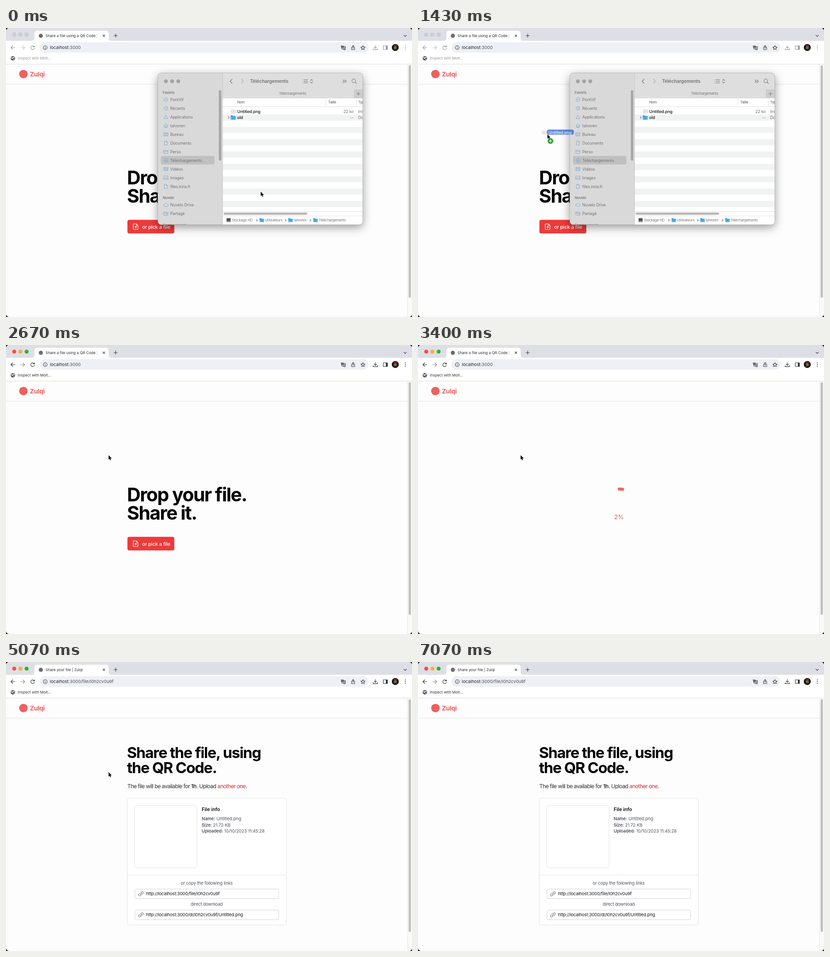
An HTML page for the animation above (7210 ms loop, 886 px wide and 632 px high).

```html
<!DOCTYPE html>
<html lang="en">
<head>
<meta charset="utf-8">
<title>Drop and share</title>
<style>
@property --p { syntax: "<integer>"; inherits: true; initial-value: 0; }

html, body { margin: 0; width: 100%; height: 100%; overflow: hidden; background: #17181b; }
body { position: relative; font-family: Inter, "Liberation Sans", sans-serif; font-optical-sizing: none; }
svg { display: block; position: absolute; left: 0; top: 0; }
.line { fill: none; stroke: currentColor; stroke-width: 1.1; stroke-linecap: round; stroke-linejoin: round; }
.anim, .anim-late { animation: 7.21s linear infinite; }
.anim-late { animation-delay: 50ms; }

/* browser */
#ui { animation-name: focus; }
#lights { animation-name: after-drop; }
#finder { animation-name: before-drop; }
.before-url { animation-name: before-url; }
.after-url { animation-name: after-url; }
.tab { font-size: 8.1px; fill: #2b2c30; }
.url { font-size: 9.6px; letter-spacing: -.005em; fill: #242528; }
.url tspan { fill: #4c4f54; }

/* page */
.web { letter-spacing: -.02em; font-size: 9.6px; fill: #505359; }
.h1 { font-weight: 700; letter-spacing: -.04em; fill: #050505; }
.lead { font-size: 12px; letter-spacing: -.05em; fill: #2d2f33; }
.lead .bold { letter-spacing: -.02em; }
.info { letter-spacing: -.012em; }
.bold { font-weight: 600; }
.box { fill: #fff; stroke: #dfe1e5; }
.field { fill: #fff; stroke: #cfd2d8; }
.ink { fill: #151619; }
#hero { animation-name: hero; }
#result { animation-name: result; }
#zone { animation-name: zone; }
#ring {
  position: absolute; left: 368.5px; top: 305.5px; width: 140px; height: 140px;
  animation-name: ring, fill; color: #f46363;
}
#ring circle { fill: none; stroke: currentColor; stroke-width: 6.6; stroke-linecap: round; stroke-dasharray: var(--p) 200; }
#ring::after {
  counter-reset: n var(--p); content: counter(n) "%";
  position: absolute; inset: 0; line-height: 140px; text-align: center;
  font-size: 13.4px; letter-spacing: -.02em; color: #dc5c5c;
}

/* file window */
#finder { letter-spacing: -.02em; font-size: 8.8px; fill: #747474; color: #747474; }
#finder .row { font-size: 9px; font-weight: 500; fill: #151515; }
#finder .small { font-size: 7.6px; }
#finder .head { font-size: 7.6px; font-weight: 600; fill: #7c7c7c; }
#side .line { color: #7da8ce; stroke-width: .9; }

/* pointer */
#cursor, #item { animation-name: move; }
#arrow { animation-name: arrow; }
#ghost { animation-name: ghost; }
#badge { animation-name: badge; }

@keyframes move {
  0%, .42% { transform: translate(556px, 358px); animation-timing-function: cubic-bezier(.4, 0, .3, 1); }
  9.7%, 11.8% { transform: translate(529px, 182px); animation-timing-function: cubic-bezier(.45, 0, .7, .7); }
  19.83% { transform: translate(283px, 232.5px); animation-timing-function: cubic-bezier(.2, .5, .5, 1); }
  25%, 100% { transform: translate(224px, 241px); }
}
@keyframes arrow { 0%, 83.2% { opacity: 1; } 86%, 100% { opacity: 0; } }
@keyframes ghost {
  0%, 11.8% { opacity: 0; }
  11.81%, 31.4% { opacity: .78; }
  31.41%, 32.3% { opacity: 1; }
  33.2%, 100% { opacity: 0; }
}
@keyframes badge {
  0%, 18.4% { opacity: 0; }
  18.41%, 31.4% { opacity: 1; }
  31.41%, 100% { opacity: 0; }
}
@keyframes zone {
  0%, 20.8% { opacity: 0; }
  22.5%, 32.4% { opacity: 1; }
  34.4%, 100% { opacity: 0; }
}
@keyframes focus {
  0%, 33.3% { color: #94969b; }
  33.31%, 100% { color: #303236; }
}
@keyframes before-drop { 0%, 33.3% { opacity: 1; } 33.31%, 100% { opacity: 0; } }
@keyframes after-drop { 0%, 33.3% { opacity: 0; } 33.31%, 100% { opacity: 1; } }
@keyframes before-url { 0%, 61.4% { opacity: 1; } 61.41%, 100% { opacity: 0; } }
@keyframes after-url { 0%, 61.4% { opacity: 0; } 61.41%, 100% { opacity: 1; } }
@keyframes hero { 0%, 40.6% { opacity: 1; } 43.4%, 100% { opacity: 0; } }
@keyframes ring {
  0%, 43.4% { opacity: 0; }
  46.2%, 61.4% { opacity: 1; }
  63.8%, 100% { opacity: 0; }
}
@keyframes fill {
  0%, 46.2% { --p: 0; animation-timing-function: ease-in-out; }
  55.5%, 100% { --p: 100; }
}
@keyframes result { 0%, 63.8% { opacity: 0; } 67.5%, 100% { opacity: 1; } }
</style>
</head>
<body>
<svg width="886" height="632" viewBox="0 0 886 632">
  <defs>
    <clipPath id="screen"><rect width="886" height="632" rx="7"/></clipPath>
    <clipPath id="pane"><rect x="331.5" y="98.5" width="447" height="331.5" rx="7.5"/></clipPath>
    <clipPath id="tabClip"><rect x="86" y="8" width="113" height="18"/></clipPath>
    <pattern id="zebra" y="189.2" width="10" height="27" patternUnits="userSpaceOnUse">
      <rect width="10" height="27" fill="#fff"/><rect width="10" height="13.5" fill="#f1f3f3"/>
    </pattern>
    <g id="folder">
      <path d="M0 1q0-1 1-1h3l1.2 1.3H10q1 0 1 1V4H0z" fill="#2f8fd6"/>
      <rect y="2.4" width="11" height="7" rx="1" fill="#53b5f1"/>
      <rect x="3.5" y="4.7" width="4" height="2.4" rx=".6" fill="#3595d8"/>
    </g>
    <g id="image">
      <rect x=".4" y=".4" width="9.2" height="6.6" rx="1.2" fill="#f7f7f7" stroke="#b4b4b4" stroke-width=".8"/>
      <rect x="2.2" y="2.2" width="5.6" height="3" rx=".6" fill="#dcdcdc"/>
    </g>
    <path id="link" class="line" d="M-1.2 1.5l3-3M-.6-2l1.8-1.9a2.3 2.3 0 0 1 3.3 3.3L2.6 1.2M.6 2l-1.8 1.9a2.3 2.3 0 0 1-3.3-3.3L-2.6-1.2"/>
  </defs>

  <g clip-path="url(#screen)">
    <rect width="886" height="632" fill="#fdfdfd"/>

    <g id="ui" class="anim">
      <rect width="886" height="28" fill="#dedfe6"/>
      <path d="M56 28q6 0 6-6V12q0-6 6-6H218q6 0 6 6V22q0 6 6 6z" fill="#fff"/>
      <rect y="28" width="886" height="51" fill="#fff"/>
      <rect x="73" y="31" width="718" height="23" rx="11.5" fill="#eef0f6"/>
      <path d="M0 79H886" stroke="#dadbdd"/>
      <g fill="#cfd0d6" stroke="#b4b5bb" stroke-width=".6">
        <circle cx="18" cy="14.5" r="4"/><circle cx="31.5" cy="14.5" r="4"/><circle cx="45" cy="14.5" r="4"/>
      </g>
      <g id="lights" class="anim">
        <circle cx="18" cy="14.5" r="4.3" fill="#fe4a43"/>
        <circle cx="31.5" cy="14.5" r="4.3" fill="#fbb02b"/>
        <circle cx="45" cy="14.5" r="4.3" fill="#25b53a"/>
      </g>
      <circle cx="76" cy="17" r="4.5" fill="#76686a"/>
      <g class="tab" clip-path="url(#tabClip)">
        <text class="anim before-url" x="86.3" y="19.9">Share a file using a QR Code | Zulqi</text>
        <text class="anim after-url" x="86.3" y="19.9">Share your file | Zulqi</text>
      </g>
      <g class="line" color="#3a3c40">
        <path d="M211.7 14.8l4 4m0-4l-4 4M235.5 16.7h7.6m-3.8-3.8v7.6M868.3 15.7l2.8 2.8 2.8-2.8"/>
        <circle cx="85.5" cy="43" r="4.2"/><path d="M85.5 42.7v2.4m0-4.4v.1"/>
        <path d="M731.3 39h4.4l2.4 7.2h-4.8zM735 40.5h5.6v7h-3.4M732.7 41.4h2.6m-1.3-.8q0 2.6-1.3 3.2m.6-2q.8 1.6 1.9 2M736.4 43.3h3"/>
        <path d="M755.8 42h-1.7v5.2h6.8V42h-1.7M757.5 44.6v-6.2m-1.9 1.8l1.9-1.8 1.9 1.8"/>
        <path d="M779 38.4l1.4 3 3.2.4-2.4 2.2.7 3.2-2.9-1.6-2.9 1.6.7-3.2-2.4-2.2 3.2-.4z"/>
      </g>
      <g class="line">
        <path d="M19.3 43h-8.6m4-4l-4 4 4 4"/>
        <path opacity=".55" d="M32.2 43h8.6m-4-4l4 4-4 4"/>
        <path d="M61.5 41A4 4 0 1 0 62 44.2M62.2 38.7v2.7h-2.7"/>
        <path d="M806 38.2v6m-2.6-2.4l2.6 2.5 2.6-2.5M801.2 44.8v2.6h9.6v-2.6"/>
        <path d="M823.4 39h9v8h-9z"/>
      </g>
      <g fill="currentColor">
        <path d="M829 39h3.4v8H829z"/>
        <circle cx="871.5" cy="39.3" r="1"/><circle cx="871.5" cy="43" r="1"/><circle cx="871.5" cy="46.7" r="1"/>
        <text x="25.8" y="69.2" font-size="8.1">Inspect with Molt…</text>
      </g>
      <circle cx="849.5" cy="42.7" r="7.6" fill="#24100d"/>
      <path d="M846 42q3.5-4 7 0l-1 4h-5z" fill="#4e7a49"/>
      <path d="M845 39q4.5-4 9 0l-1.5 1h-6zM844.5 46q5 4 10 0l-1 2h-8z" fill="#8d2a20"/>
      <circle cx="15" cy="66.3" r="4.8" fill="#505256"/>
      <path d="M11.5 64.5q3-1 3.5 1t-2 2zM16 62.7l2.5 2-1.2 1.8-2-1.5zM15.5 68.5l2.5-.8-1.5 2.3z" fill="#fff"/>
      <g class="url">
        <text class="anim before-url" x="95.8" y="46.4">localhost<tspan>:3000</tspan></text>
        <text class="anim after-url" x="95.8" y="46.4">localhost<tspan>:3000/file/l0h2cv0u9f</tspan></text>
      </g>
    </g>

    <path d="M0 123H876" stroke="#e1e2e4"/>
    <circle cx="38" cy="100.7" r="9.3" fill="#ef6060"/>
    <text class="web" x="52" y="105.6" style="font-size:13.8px;font-weight:700;fill:#ef6060">Zulqi</text>
    <rect x="876" y="80" width="10" height="552" fill="#fafafa"/>
    <path d="M876.3 80V632" stroke="#e6e6e6"/>
    <rect x="878.7" y="81.5" width="5" height="508.5" rx="2.5" fill="#bfbfbf"/>

    <g id="hero" class="anim web">
      <g class="h1" font-size="41.3">
        <text x="264" y="341.5">Drop your file.</text>
        <text x="264" y="382.3">Share it.</text>
      </g>
      <rect x="265" y="419.5" width="102.3" height="29.7" rx="4" fill="#ed3a3a"/>
      <g class="line" color="#fff">
        <path d="M284.5 428.3h-5.7q-1 0-1 1v10.4q0 1 1 1h8.2q1 0 1-1v-7.9zv3.5h3.5M283 438.3v-4.7m-2 1.9l2-2 2 2"/>
      </g>
      <text x="297" y="438.5" style="font-size:11px;font-weight:500;fill:#fff">or pick a file</text>
    </g>

    <g id="result" class="anim web">
      <g class="h1" font-size="33">
        <text x="264" y="210.2">Share the file, using</text>
        <text x="264" y="243">the QR Code.</text>
      </g>
      <text class="lead" x="264.8" y="276.2">The file will be available for <tspan class="bold">1h</tspan>. Upload <tspan fill="#d32d2d">another one</tspan>.</text>
      <rect class="box" x="264.5" y="297.5" width="347" height="277.5" rx="5"/>
      <rect class="box" x="280.5" y="314" width="136.5" height="136" rx="5"/>
      <path d="M264.5 466H611.5" stroke="#dfe1e5"/>
      <text class="bold ink" x="427" y="326.3" font-size="11">File info</text>
      <g class="info">
        <text x="427" y="346"><tspan class="bold">Name:</tspan> Untitled.png</text>
        <text x="427" y="359.5"><tspan class="bold">Size:</tspan> 21.72 KB</text>
        <text x="427" y="373"><tspan class="bold">Uploaded:</tspan> 10/10/2023 11:45:28</text>
      </g>
      <g text-anchor="middle">
        <text x="438" y="487.3">or copy the following links</text>
        <text x="438" y="533.3">direct download</text>
      </g>
      <rect class="field" x="281.5" y="496.5" width="313.5" height="21" rx="3"/>
      <rect class="field" x="281.5" y="542.5" width="313.5" height="21" rx="3"/>
      <g color="#777a80"><use href="#link" x="294.5" y="507"/><use href="#link" x="294.5" y="553"/></g>
      <text class="ink" x="305.5" y="510.4">http://localhost:3000/file/l0h2cv0u9f</text>
      <text class="ink" x="305.5" y="556.4">http://localhost:3000/dl/l0h2cv0u9f/Untitled.png</text>
    </g>

    <rect id="zone" class="anim" x="2.5" y="125.5" width="870.5" height="504" fill="none" stroke="#fbc1bf" stroke-width="5" style="filter:drop-shadow(0 0 2px #fbc1bf)"/>

    <g id="finder" class="anim">
      <rect x="331.5" y="98.5" width="447" height="331.5" rx="7.5" fill="#ddd" style="filter:drop-shadow(0 6px 10px #0006)"/>
      <g clip-path="url(#pane)">
        <rect x="331" y="98" width="142" height="333" fill="#d9d9d9"/>
        <rect x="473" y="98" width="306" height="55.5" fill="#dedede"/>
        <rect x="760" y="134" width="20" height="19.5" fill="#cdcdcd"/>
        <rect x="473" y="153.5" width="306" height="277" fill="#fff"/>
        <rect x="473" y="175.7" width="306" height="225.3" fill="url(#zebra)"/>
        <path d="M472.7 98V430M760 134V153.5" stroke="#c3c3c3" stroke-width=".8"/>
        <path d="M473 153.5H779M473 172H779M473 401.5H779M473 411H779M698 155V170M764.5 155V170" stroke="#dcdcdc" stroke-width=".9"/>
        <rect x="474.8" y="403.6" width="182.5" height="5" rx="2.5" fill="#b8b8b8"/>
        <g fill="#a3a3a3"><circle cx="349" cy="116.5" r="4.2"/><circle cx="362.5" cy="116.5" r="4.2"/><circle cx="376" cy="116.5" r="4.2"/></g>
        <g class="line">
          <path d="M493.5 112l-4.5 4.5 4.5 4.5"/><path opacity=".45" d="M513.8 112l4.5 4.5-4.5 4.5"/>
          <path d="M647.5 113h.2m2.6 0h8M647.5 116.5h.2m2.6 0h8M647.5 120h.2m2.6 0h8M664.7 114.8l2.2-2.3 2.2 2.3m-4.4 3.4l2.2 2.3 2.2-2.3"/>
          <path d="M735.3 113.3l3.2 3.2-3.2 3.2m4.2-6.4l3.2 3.2-3.2 3.2M761.8 118.7l2.9 2.9M765.5 143.8h7m-3.5-3.5v7"/>
          <circle cx="758.8" cy="115.7" r="3.9"/>
        </g>
        <text x="532.5" y="120.1" style="font-size:10.3px;font-weight:600">Téléchargements</text>
        <text class="small" x="625.5" y="146.3" text-anchor="middle">Téléchargements</text>
        <g class="small" fill="#555"><text x="504.7" y="164.8">Nom</text><text x="703" y="164.8">Taille</text><text x="768.5" y="164.8">Type</text></g>
        <use href="#image" x="491" y="178.8"/><use href="#folder" x="490.3" y="191.3"/>
        <path class="line" d="M485 193.5l2.3 2.3-2.3 2.3"/>
        <text class="row" x="504.5" y="185.7">Untitled.png</text><text class="row" x="504.5" y="199.2">old</text>
        <g style="font-size:9px" fill="#737373">
          <text x="759" y="185.7" text-anchor="end">22 ko</text><text x="759" y="199.2" text-anchor="end">--</text>
          <text x="768.5" y="185.7">Image</text><text x="768.5" y="199.2">Dossier</text>
        </g>
        <rect x="481" y="415.5" width="9.5" height="9" rx="1.2" fill="#8b8b8b"/><rect x="482" y="416.5" width="7.5" height="5" fill="#4b4b4b"/>
        <use href="#folder" transform="translate(553.3 416) scale(.9)"/>
        <use href="#folder" transform="translate(616 416) scale(.9)"/>
        <use href="#folder" transform="translate(670.3 416) scale(.9)"/>
        <g class="small">
          <text x="493" y="423">Stockage HD</text><text x="565.3" y="423">Utilisateurs</text>
          <text x="628" y="423">talvoren</text><text x="682.3" y="423">Téléchargements</text>
        </g>
        <path class="line" d="M546.5 418.5l2 2-2 2M609.3 418.5l2 2-2 2M663.5 418.5l2 2-2 2"/>
        <rect x="464.5" y="136" width="5.3" height="154" rx="2.6" fill="#a6a6a6"/>
        <rect x="338" y="279.7" width="117" height="18.7" rx="4" fill="#c0c0c0"/>
        <g class="head"><text x="342" y="143.5">Favoris</text><text x="342" y="373.6">Nuvelo</text><text x="342" y="433.5">Emplacements</text></g>
        <g id="side"></g>
      </g>
      <rect x="331.3" y="98.3" width="447.4" height="331.9" rx="7.7" fill="none" stroke="#a9a9a9" stroke-width=".7"/>
    </g>

    <g id="item" class="anim-late">
      <g id="ghost" class="anim">
        <use href="#image" x="-36" y="-3"/>
        <rect x="-25" y="-5.5" width="58.5" height="11" rx="4" fill="#2864cf"/>
        <text x="-22" y="3.5" fill="#fff" style="font-size:9px;letter-spacing:-.02em;font-weight:500">Untitled.png</text>
      </g>
    </g>
    <g id="cursor" class="anim">
      <path id="arrow" class="anim" d="M0 0V9.4L2.1 7.5 3.6 10.9 5.2 10.2 3.8 6.9H6.7Z" stroke="#fff" paint-order="stroke" style="filter:drop-shadow(0 .6px .6px #0006)"/>
      <g id="badge" class="anim">
        <circle cx="6.5" cy="14.5" r="6.3" fill="#189322" stroke="#fff" stroke-width=".5"/>
        <path d="M3 14.5h7M6.5 11v7" stroke="#fff" stroke-width="1.6"/>
      </g>
    </g>
  </g>
</svg>
<div id="ring" class="anim">
  <svg width="140" height="140"><circle cx="70" cy="70" r="61" pathLength="100" transform="rotate(-90 70 70)"/></svg>
</div>
<script>
const disc = "M-4 0a4 4 0 1 1 8 0a4 4 0 1 1-8 0";
const page = "M-3-4.3H1L3.3-2V4.3H-3zM1-4.3V-2H3.3";
const frame = "M-4.5-3.5h9v7h-9z";
const folder = "M-4.5-3.5h3l1 1.2h5v6h-9zM-4.5-.8h9";
const places = [
  ["PontVif", disc + "M-1.5 0h3"],
  ["Récents", disc + "M0-2.2V0l1.5 1"],
  ["Applications", "M0-3.7L4 3.4H-4z"],
  ["talvoren", "M-4.7 0L0-4.2 4.7 0M-3.3-1V4h6.6v-5M-1 4V1h2v3"],
  ["Bureau", frame + "M-4.5-1.5h9M-3 1.8h6"],
  ["Documents", page],
  ["Perso", folder],
  ["Téléchargements", disc + "M0-2.2V2m-1.6-1.6L0 2l1.6-1.6"],
  ["Vidéos", frame + "M-2.5-3.5v7M2.5-3.5v7M-2.5 0h5"],
  ["Images", frame + "M-4.5 2.5l3-3 2 2 1.5-1.5 2.5 2.5"],
  ["files.inria.fr", page],
  ["Nuvelo Drive", "M-3 3.2a2.3 2.3 0 0 1 0-4.5a3 3 0 0 1 5.6-.6a2.6 2.6 0 0 1 .6 5.1z"],
  ["Partagé", folder + "M1 1.5h2"]
];
document.getElementById("side").innerHTML = places.map(([name, icon], i) => {
  const y = i < 11 ? 156.7 + 18.97 * i : 386.6 + 19 * (i - 11);
  return `<path class="line" transform="translate(349 ${y})" d="${icon}"/><text x="358.5" y="${y + 3.1}">${name}</text>`;
}).join("");
</script>
</body>
</html>
```
